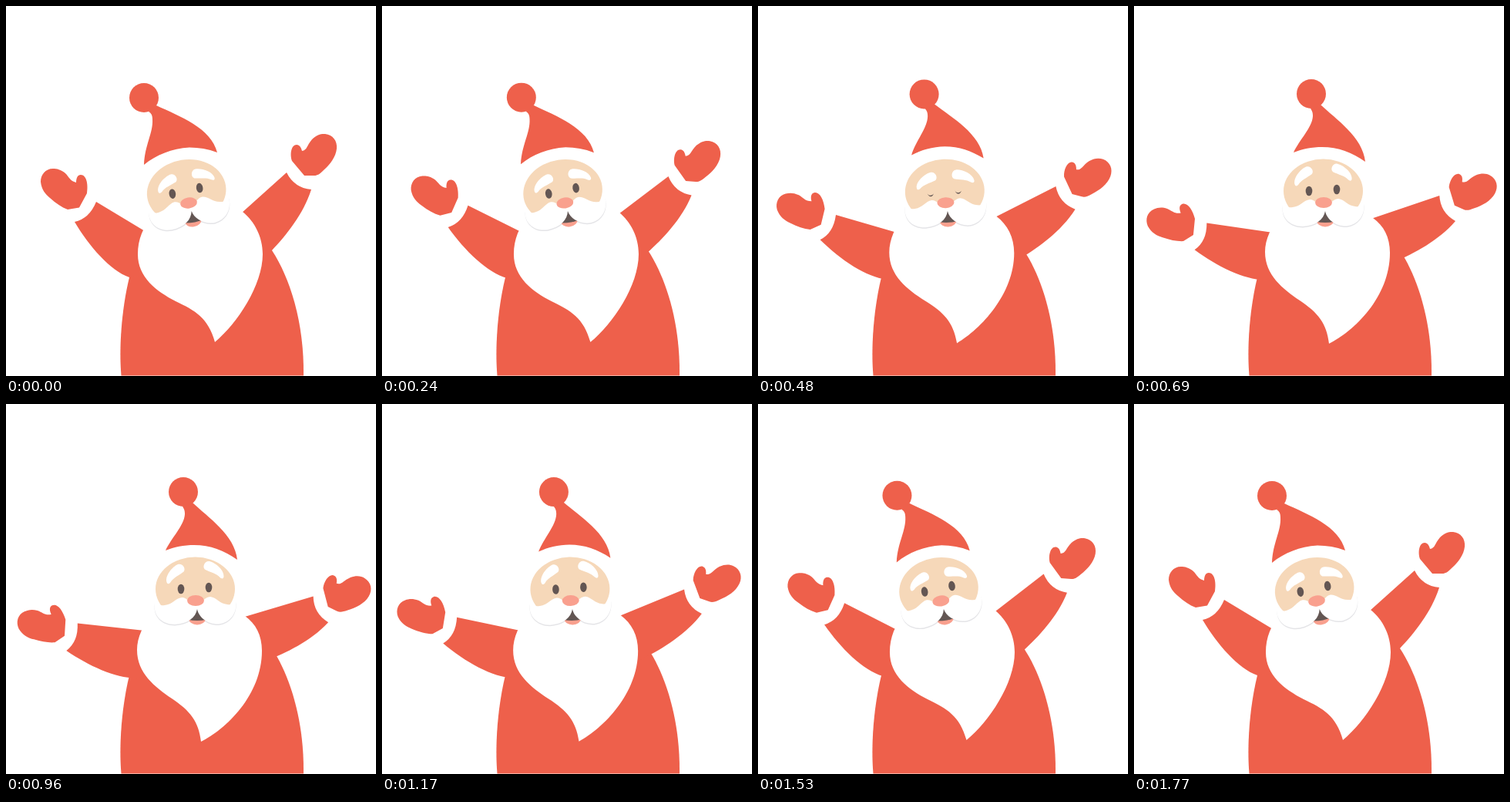
An HTML page that plays this animation: 480 by 480 pixels, repeating every 1800 ms.

```html
<!DOCTYPE html>
<html lang="en">
<head>
<meta charset="utf-8">
<title>Waving Santa</title>
<style>
  html, body { margin: 0; width: 100%; height: 100%; overflow: hidden; background: #fff; }
  svg { display: block; width: 100vw; height: 100vh; }
  .red { fill: #ee604b; }
  .skin { fill: #f6d8b9; }
  .pink { fill: #f9a08e; }
  .dark { fill: #635653; }
  .white { fill: #fff; }
  .shade { fill: #e4e4e7; }
</style>
</head>
<body>
<svg viewBox="0 0 480 480">
  <defs>
    <path id="brow" d="M-15,3 C-12,-5 2,-9 10,-7.500 C16,-6 16,3 11,4.500 C3,5 -5,3 -11,6 C-14,7 -16,6 -15,3 Z"/>
    <path id="stache" d="M246,259 C240,262 236,251 228,251 C220,252 216,260 206,261 C200,262 196,260 193,257 C190,274 202,286 219,286 C236,285 246,277 248,266 C250,277 262,286 276,285.500 C290,284 300,272 298.500,256 C296,259 292,261 287,260 C277,259 273,251 265,250 C257,250 253,261 246,259 Z"/>
  </defs>

  <path class="red" d="M149.500,479.400 C146.500,445 149.500,395 160,352 L190,300 L320,300 L345,317 C368,352 387,410 386,479.400 Z"/>

  <g id="armL" class="red">
    <path d="M117,254 L190,298 L185,350 L160,352 C135,343 108,312 89,280 Q108,276 117,254 Z"/>
    <path d="M105,243 C107,230 104,219 97,219 C93,219 91,223 91,229 C83,227 82,222 77,217 C71,212 66,211 61,211 C51,211 45,219 45,228 C46,238 51,244 57,249 C65,256 72,261 80,264 L95,261.500 Z"/>
  </g>
  <g id="armR" class="red">
    <path d="M364,216 Q374,236 396,238 C386,270 363,298 345,317 L330,335 L300,320 L295,278 Z"/>
    <path d="M387,220 L371,201 C368,192 370,180 377,180 C381,180 383,184 384,188 C391,187 390,181 397,173 C403,167 409,165.500 414,166 C424,167 430,175 429,185 C428,196 420,206 412,213 C407,218 404,220 400,220 Z"/>
  </g>

  <path id="beard" class="white"/>

  <g id="hat" class="red">
    <path id="cone"/>
    <circle id="pom" r="19"/>
  </g>

  <g id="face">
    <ellipse class="skin" cx="245.500" cy="240" rx="51.500" ry="41.500"/>
    <ellipse class="dark" cx="227" cy="240" rx="4.300" ry="6.300"/>
    <ellipse class="dark" cx="263" cy="238" rx="4.300" ry="6.300"/>
    <g id="lids" class="skin">
      <ellipse cx="227" cy="240" rx="5.800" ry="7"/>
      <ellipse cx="263" cy="238" rx="5.800" ry="7"/>
    </g>
    <use id="browL" class="white" href="#brow"/>
    <use id="browR" class="white" href="#brow"/>
    <use class="shade" href="#stache" y="1.500"/>
    <ellipse class="pink" cx="248" cy="278.500" rx="11" ry="7.900"/>
    <path class="dark" d="M248,262 L235,279.500 Q248,282.500 261,279.500 Z"/>
    <use class="white" href="#stache"/>
    <ellipse class="pink" cx="246" cy="255" rx="11" ry="7"/>
  </g>
</svg>

<script>
  const LOOP = 1800, STEP = 30;
  const $ = id => document.getElementById(id);
  const set = (id, name, value) => $(id).setAttribute(name, value);
  const mix = (a, b, k) => a + (b - a) * k;

  // Smooth 0..1 ramp between two times
  const ramp = (t, from, to) => {
    const k = Math.min(1, Math.max(0, (t - from) / (to - from)));
    return (1 - Math.cos(Math.PI * k)) / 2;
  };
  const swell = (t, up0, up1, down0, down1) => ramp(t, up0, up1) - ramp(t, down0, down1);

  // Blend two paths that share the same commands
  const morph = ([a, b], k) => {
    const ends = b.match(/[\d.]+/g);
    let i = 0;
    return a.replace(/[\d.]+/g, n => mix(+n, +ends[i++], k).toFixed(2));
  };

  const CONE = [
    "M179,206 C180,180 191,165 190,147 C190,141 188,139 185,137 L195,129 C225,143 266,158 274,190 C262,185.5 250,183.5 238,183.5 C215,185 195,193 179,206 Z",
    "M207,190 C215,173 231,158 232,143 C232,138 231,136 229,133 L242,128 C262,147 297,170 300,202 C283,190 265,183 244,183 C231,183 218,185.5 207,190 Z"
  ];
  const BEARD = [
    "M190,275 C178,285 171,303 171,322 C171,352 195,370 220,383 C245,395 262,404 271,436 C300,412 333,362 333,322 C333,300 323,280 307,267 Z",
    "M190,275 C178,285 170,303 170,319 C170,349 193,367 215,382 C239,398 250,412 253,438 C285,422 332,378 332,320 C332,300 324,285 310,275 Z"
  ];

  function draw(t) {
    const arms = (1 - Math.cos(Math.PI * (t + 8) / 885)) / 2;
    const head = swell(t, 184, 644, 1035, 1590);
    const brows = swell(t, 540, 720, 1350, 1530);
    const blink = swell(t, 390, 480, 480, 570);

    set("armL", "transform", `rotate(${-25.5 * arms} 174 324)`);
    set("armR", "transform", `rotate(${26 * arms} 307 309.5)`);

    set("beard", "d", morph(BEARD, head));
    set("cone", "d", morph(CONE, head));
    set("pom", "cx", mix(179, 230, head));
    set("pom", "cy", mix(119, 114, head));
    set("hat", "transform", `translate(0 ${-5 * head * (1 - head)})`);

    set("face", "transform",
      `translate(${-9 * (1 - head)} ${0.5 * (1 - head)}) rotate(${-9 * (1 - head)} 246 255)`);
    set("lids", "transform", `translate(0 ${mix(-14, -2.2, blink)})`);
    set("browL", "transform",
      `translate(${mix(222, 219, brows)} ${mix(225.5, 220, brows)}) rotate(${mix(-22, -35, brows)})`);
    set("browR", "transform",
      `translate(270 ${mix(222, 215, brows)}) rotate(${mix(10, 24, brows)}) scale(-1 1)`);
  }

  function tick() {
    const t = performance.now() % LOOP;
    draw(Math.floor(t / STEP) * STEP);
    requestAnimationFrame(tick);
  }
  tick();
</script>
</body>
</html>
```
